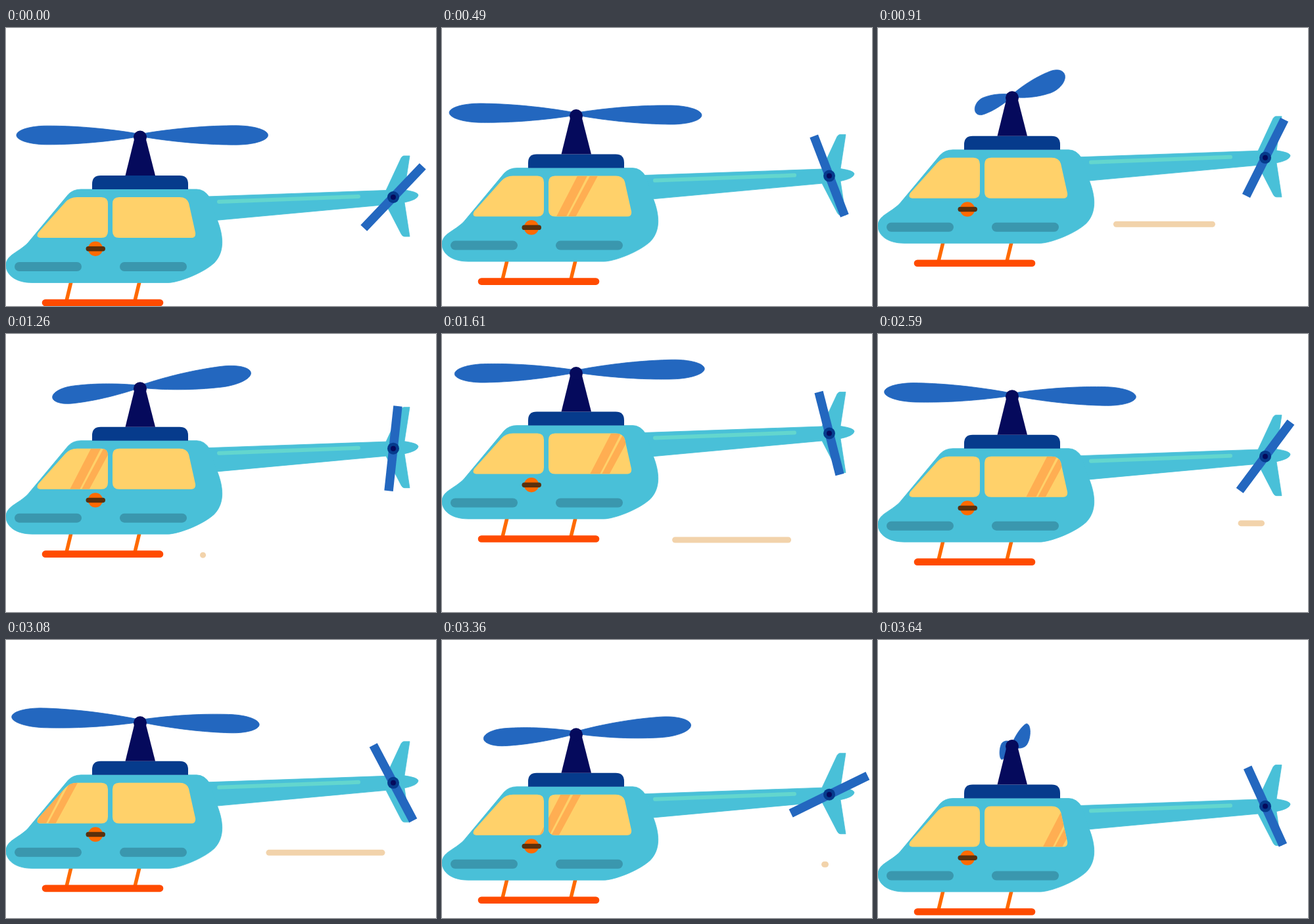
An HTML page for the animation above (3710 ms loop, 654 px wide and 424 px high).

```html
<!DOCTYPE html>
<html lang="en">
<head>
<meta charset="utf-8">
<title>Helicopter</title>
<style>
  html, body { margin: 0; width: 100%; height: 100%; overflow: hidden; background: #fff; }
  svg { display: block; }
</style>
</head>
<body>
<svg width="654" height="424" viewBox="0 0 654 424">
  <defs>
    <path id="panes" d="M49 312L90 266Q97 258 108 258H145Q155 258 155 268V310Q155 320 145 320H52Q45 319 49 312Z
      M172 258H264Q275 258 278 267L288 312Q289 320 282 320H172Q162 320 162 310V268Q162 258 172 258Z"/>
    <clipPath id="glass"><use href="#panes"/></clipPath>
  </defs>
  <g id="heli">
    <path d="M99 387L92 416M203 387L196 416" stroke="#ff6a00" stroke-width="5.500"/>
    <rect x="54.700" y="413.700" width="184.600" height="10.600" rx="5.300" fill="#ff4b00"/>
    <g fill="#49c0d8" stroke="#49c0d8" stroke-width=".8">
      <path d="M306 257L578 247.500 601 198Q603 195 605 195H614L606 247Q627 250 627 255Q626 262 606 266L614 318H606Q603 318 601 314L578 269.500 318 293.500Z"/>
      <path d="M0 362C0 346 18 343 33 328L94.500 254Q102 246 114 246H290Q302 246 310 259L321 292C334 325 329 345 317 358C300 374 262 388.500 246 388.500H40C14 388.500 0 376 0 362Z"/>
    </g>
    <path d="M324 265L536 257" stroke="#63d6ce" stroke-width="6" stroke-linecap="round"/>
    <use href="#panes" fill="#ffd16a"/>
    <g clip-path="url(#glass)">
      <path id="shine" d="M225 320H240L272 258H257ZM243 320H254.500L288 258H276Z" fill="#ffae52"/>
    </g>
    <circle cx="136" cy="336.700" r="11.200" fill="#ff6a00"/>
    <rect x="121.500" y="333" width="29.500" height="7.500" rx="3.700" fill="#5a300c"/>
    <g fill="#3a97ae">
      <rect x="13" y="357" width="102" height="14" rx="7"/>
      <rect x="173" y="357" width="102" height="14" rx="7"/>
    </g>
    <path id="rotor" fill="#2367bf" stroke="#2367bf" stroke-width=".8"/>
    <path d="M131 246V238Q131 225 144 225H264Q277 225 277 238V246Z" fill="#063b8c"/>
    <g fill="#050a5c">
      <path d="M196 166L181.500 225H227L212 166Z"/>
      <circle cx="204" cy="166.500" r="10"/>
    </g>
    <g transform="translate(589 258)">
      <path id="tail" d="M-65 0H65" stroke="#2367bf" stroke-width="13.500"/>
      <circle r="9" fill="#063b8c"/>
      <circle r="4" fill="#050a5c"/>
    </g>
    <path id="wind" fill="none" stroke="#f2d3ab" stroke-width="9" stroke-linecap="round"/>
  </g>
</svg>
<script>
const [heli, shine, rotor, tail, wind] =
  ['heli', 'shine', 'rotor', 'tail', 'wind'].map(id => document.getElementById(id));

const STEP = 70, STEPS = 53, PEAK = 26, LIFT = 120.4;
const HUB = { x: 204, y: 163.5 }, BLADE = 192, HORIZON = 244, DEPTH = 0.184;
const GUSTS = [
  { start: 8.2, y: 359.5, length: 155 },
  { start: 17.8, y: 420.5, length: 181 },
  { start: 27.45, y: 360, length: 181 },
  { start: 37.8, y: 364.5, length: 181 }
];

const clamp = (v, lo, hi) => Math.min(hi, Math.max(lo, v));

// Half of the blade's height at t, from hub (0) to tip (1).
const halfHeight = t => t < 0.75
  ? 1.5 + 13 * Math.sin(t / 0.75 * Math.PI / 2) ** 0.85
  : 14.5 * Math.sqrt(Math.max(0, 1 - ((t - 0.75) / 0.25) ** 2));

// Upright blade turning about the mast, seen in perspective.
function bladePath(angle, rise, side) {
  const project = (t, v) => {
    const u = side * t * BLADE, x = u * Math.cos(angle);
    const scale = 1 / (1 - DEPTH * u * Math.sin(angle) / BLADE);
    const y = HUB.y + rise + v + x * 0.007 - HORIZON;
    return `${(HUB.x + x * scale).toFixed(2)} ${(HORIZON + y * scale - rise).toFixed(2)}`;
  };
  const top = [], bottom = [];
  for (let k = 0; k <= 40; k++) {
    const t = Math.sin(k / 40 * Math.PI / 2), h = halfHeight(t);
    top.push(project(t, -h));
    bottom.unshift(project(t, h));
  }
  return `M${top.concat(bottom).join('L')}Z`;
}

function gustPath(step) {
  return GUSTS.map(({ start, y, length }) => {
    const head = 295 + 45.4 * (step - start);
    const left = clamp(head - length, 295, 588), right = clamp(head, 295, 588);
    return right - left > 9 ? `M${left + 4.5} ${y}H${right - 4.5}` : '';
  }).join('');
}

function draw() {
  const step = Math.floor(performance.now() / STEP) % STEPS;
  const rise = -LIFT * (step < PEAK ? step / PEAK : (STEPS - step) / (STEPS - PEAK));
  const angle = (5.2 + step * 5400 / STEPS) * Math.PI / 180;
  heli.setAttribute('transform', `translate(0 ${rise})`);
  rotor.setAttribute('d', bladePath(angle, rise, 1) + bladePath(angle, rise, -1));
  tail.setAttribute('transform', `rotate(${-46.5 + step * 3600 / STEPS})`);
  shine.setAttribute('transform', `translate(${-179 + 25.6 * ((step + 12) % 14)})`);
  wind.setAttribute('d', gustPath(step));
  requestAnimationFrame(draw);
}
draw();
</script>
</body>
</html>
```
